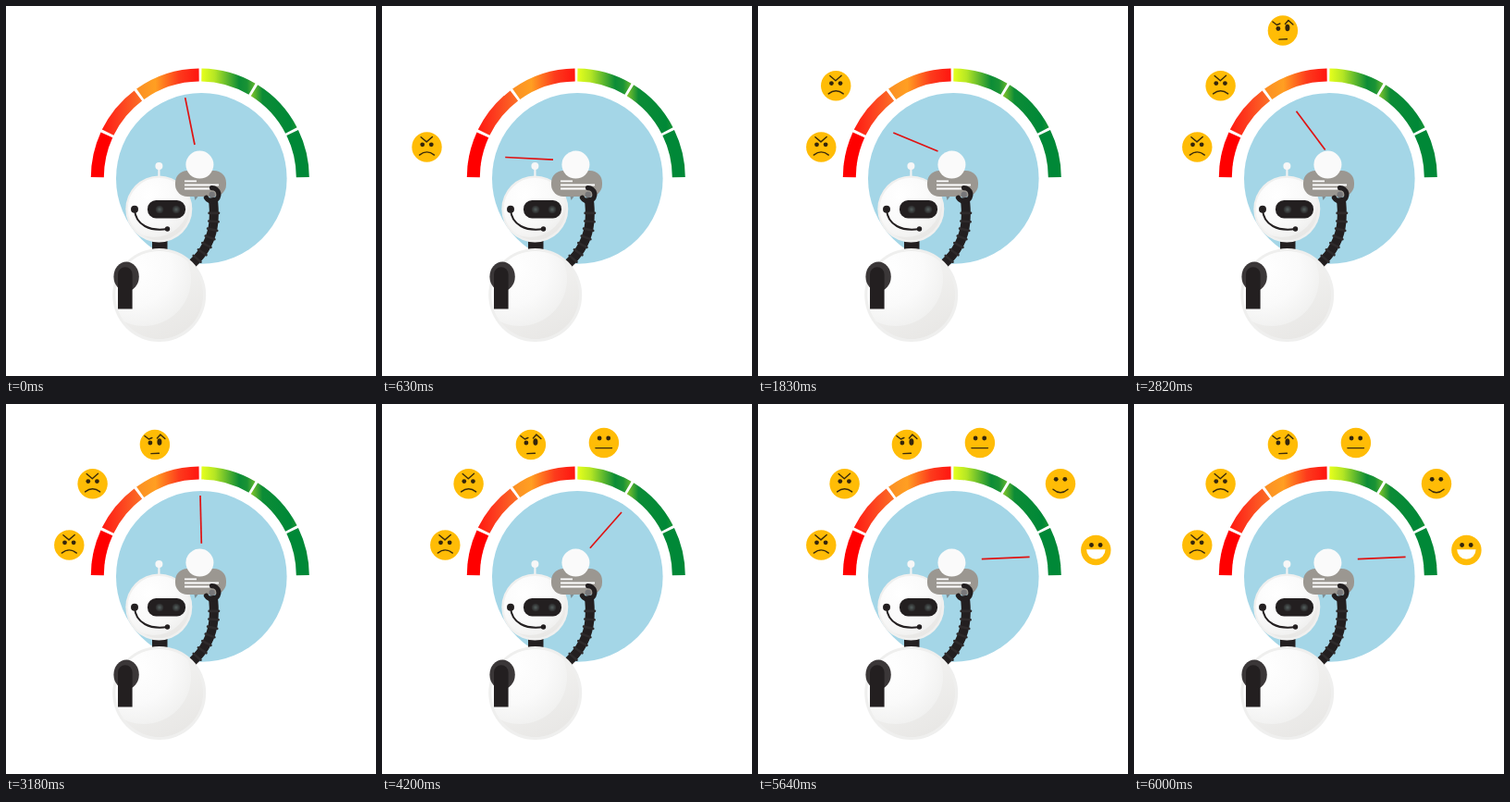
These frames come from a looping animation (400x400 px, 7080 ms). An HTML page:

```html
<!DOCTYPE html>
<html lang="en">
<head>
<meta charset="utf-8">
<title>Mood gauge</title>
<style>
  html, body { margin: 0; width: 100%; height: 100%; overflow: hidden; background: #fff; }
  svg { display: block; width: 100vw; height: 100vh; }
  .ink { fill: none; stroke: #3a2b0c; stroke-width: 1.4; stroke-linecap: round; stroke-linejoin: round; }
  .eye { fill: #33250c; }
</style>
</head>
<body>
<svg viewBox="0 0 400 400" xmlns="http://www.w3.org/2000/svg">
  <defs>
    <linearGradient id="g1"><stop stop-color="#ff1a10"/><stop offset=".4" stop-color="#fd3a1e"/><stop offset="1" stop-color="#fb7026"/></linearGradient>
    <linearGradient id="g2"><stop stop-color="#fb8f24"/><stop offset=".3" stop-color="#ff9f22"/><stop offset=".68" stop-color="#fd3a1c"/><stop offset="1" stop-color="#ff1510"/></linearGradient>
    <linearGradient id="g3"><stop stop-color="#e6ff1c"/><stop offset=".25" stop-color="#b4e624"/><stop offset=".7" stop-color="#0c8c36"/><stop offset=".85" stop-color="#1a9335"/><stop offset="1" stop-color="#66b82e"/></linearGradient>
    <linearGradient id="g4"><stop stop-color="#86c62a"/><stop offset=".25" stop-color="#0c8c36"/><stop offset=".85" stop-color="#008837"/><stop offset="1" stop-color="#1a9335"/></linearGradient>
    <radialGradient id="lit" cx=".42" cy=".4" r=".62"><stop stop-color="#fff"/><stop offset=".6" stop-color="#fafafa"/><stop offset="1" stop-color="#f1f1f0"/></radialGradient>
    <linearGradient id="shade" x1=".2" y1="0" x2=".7" y2="1"><stop stop-color="#f6f6f5"/><stop offset="1" stop-color="#e8e7e5"/></linearGradient>
    <radialGradient id="lens"><stop stop-color="#55605f"/><stop offset="1" stop-color="#262425"/></radialGradient>
    <clipPath id="bodyClip"><circle cx="165.7" cy="312.5" r="47.5"/></clipPath>
    <clipPath id="headClip"><circle cx="165.3" cy="219.5" r="33.7"/></clipPath>
  </defs>

  <g id="gauge"></g>
  <circle cx="211.3" cy="186.4" r="92.3" fill="#a4d6e7"/>
  <line id="needle" stroke="#e01212" stroke-width="1.7"/>

  <!-- robot -->
  <path d="M158 253H174.5V265H158Z" fill="#231f20"/>
  <path d="M165.4 176V187" stroke="#f3f3f3" stroke-width="2.2"/>
  <circle cx="165.4" cy="173" r="4" fill="#f7f7f7"/>

  <path id="hose" d="M201 279C215 266 223 250 224.5 233Q225.5 219 223.5 207" fill="none" stroke="#231f20" stroke-width="10"/>
  <g id="ribs" stroke="#2e2a2b" stroke-width="2.6" stroke-linecap="round"></g>

  <circle cx="165.7" cy="312.5" r="50.5" fill="#efefee"/>
  <g clip-path="url(#bodyClip)">
    <circle cx="165.7" cy="312.5" r="47.5" fill="url(#shade)"/>
    <circle cx="149" cy="295" r="51" fill="url(#lit)"/>
  </g>
  <circle cx="165.3" cy="219.5" r="36" fill="#f0f0ef"/>
  <g clip-path="url(#headClip)">
    <circle cx="165.3" cy="219.5" r="33.7" fill="url(#shade)"/>
    <circle cx="160" cy="212" r="38" fill="url(#lit)"/>
  </g>

  <rect x="153" y="210" width="41" height="19.5" rx="9.2" fill="#231f20"/>
  <g fill="url(#lens)"><circle cx="166" cy="220" r="4.6"/><circle cx="184" cy="220" r="4.6"/></g>
  <path d="M139 220C140 237 156 244 174.5 241" fill="none" stroke="#231f20" stroke-width="2"/>
  <g fill="#231f20"><circle cx="139" cy="219.8" r="4"/><circle cx="174.5" cy="241" r="2.7"/></g>

  <ellipse cx="130.1" cy="292.5" rx="13.7" ry="16" fill="#3b3738"/>
  <path d="M121 327.5V290a7.8 7.8 0 0 1 15.6 0V327.5Z" fill="#231f20"/>

  <!-- speech bubble held in the hand -->
  <path d="M203 204 L204.5 210 L209 204Z" fill="#7f8f95"/>
  <rect x="183" y="178" width="55" height="28" rx="13" fill="#9b9791"/>
  <path d="M193 189.4H206M193 193.5H230M193 197.5H222" stroke="#fff" stroke-width="1.9"/>
  <circle cx="209.4" cy="171.6" r="15" fill="#fafafa"/>
  <path d="M216.4 207.2A7.2 7.2 0 1 0 222.5 196.6" fill="none" stroke="#231f20" stroke-width="5.2" stroke-linecap="round"/>
  <circle cx="222.7" cy="204" r="3.2" fill="#77777a"/>

  <g id="faces"></g>
</svg>
<script>
const LOOP = 7080, STEP = 30;
const $ = id => document.getElementById(id);
const mix = (a, b, p) => a + (b - a) * p;

// gauge: start angle, end angle (degrees from the left end), fill
const C = { x: 209.8, y: 185.5 }, OUT = 118, IN = 104;
const polar = (r, deg) => {
  const a = deg * Math.PI / 180;
  return `${(C.x - r * Math.cos(a)).toFixed(2)} ${(C.y - r * Math.sin(a)).toFixed(2)}`;
};
const bands = [
  [0.2, 24.6, "#ff0000"], [26.1, 52.9, "url(#g1)"], [54.4, 89.4, "url(#g2)"],
  [90.8, 120.4, "url(#g3)"], [121.9, 152.6, "url(#g4)"], [154.1, 179.8, "#008837"]
];
$("gauge").innerHTML = bands.map(([a, b, fill]) =>
  `<path fill="${fill}" d="M${polar(OUT, a)}A${OUT} ${OUT} 0 0 1 ${polar(OUT, b)}L${polar(IN, b)}A${IN} ${IN} 0 0 0 ${polar(IN, a)}Z"/>`
).join("");

// ribs across the hose
const hose = $("hose"), len = hose.getTotalLength();
for (let d = 8; d < len - 8; d += 9) {
  const p = hose.getPointAtLength(d), q = hose.getPointAtLength(d + 1);
  const nx = (q.y - p.y) * 5.2, ny = (p.x - q.x) * 5.2;
  $("ribs").innerHTML += `<line x1="${p.x - nx}" y1="${p.y - ny}" x2="${p.x + nx}" y2="${p.y + ny}"/>`;
}

// faces, drawn around 0,0
const ink = d => `<path class="ink" d="${d}"/>`;
const eyes = y => `<g class="eye"><circle cx="-4.8" cy="${y}" r="2.4"/><circle cx="4.8" cy="${y}" r="2.4"/></g>`;
const angry = eyes(-2.7) + ink("M-6.4 -10.8L-.3 -5.6L5.9 -11M-8 8.6Q0 2.2 8 8.6");
const doubt = `<g class="eye"><circle cx="-5" cy="-2" r="2.4"/><ellipse cx="5" cy="-3" rx="2.5" ry="3.8"/></g>`
  + ink("M-11 -9.5L-6.5 -6L-3 -7.5M2.5 -7L6 -11L11 -6.5M-4 9.6L4.5 9.2");
const flat = eyes(-5) + ink("M-9 5.6H8.6");
const smile = eyes(-5) + ink("M-8 6Q0 13 8 6");
const grin = eyes(-5.5) + `<path d="M-10.2 -.8H10.2A10.2 10.6 0 0 1 -10.2 -.8Z" fill="#fff"/>`;

// look, first and last ms, start x y, end x y
const faces = [
  [angry, 630, 840, 48.5, 152.5, 68.3, 152.5],
  [angry, 1680, 1950, 72.5, 86.3, 93.6, 86.3],
  [doubt, 2820, 3060, 160.9, 26.5, 160.9, 44],
  [flat, 3990, 4170, 239.9, 32.5, 239.9, 42],
  [smile, 4740, 4950, 342.5, 86.3, 327, 86.3],
  [grin, 5640, 6000, 365.3, 158, 359.4, 158]
];
$("faces").innerHTML = faces.map(([look]) =>
  `<g><circle r="16.2" fill="#ffbc06"/>${look}</g>`).join("");
const nodes = [...$("faces").children];

// needle: time, tip x y, tail x y
const poses = [
  [0, 193.7, 99.2, 204, 150],
  [210, 133.2, 163.5, 185, 166.2],
  [1140, 146.3, 137, 194.5, 157],
  [2130, 175.5, 113.7, 206.7, 155.5],
  [3180, 210, 99, 211.3, 150.8],
  [4200, 259, 117, 224.9, 155.8],
  [5250, 293.6, 165.3, 241.8, 167.7]
];
const HUB = { x: 208, y: 167 };

// turn a point around the hub
function swing(x0, y0, x1, y1, p) {
  const r = mix(Math.hypot(x0 - HUB.x, y0 - HUB.y), Math.hypot(x1 - HUB.x, y1 - HUB.y), p);
  const a = mix(Math.atan2(HUB.y - y0, HUB.x - x0), Math.atan2(HUB.y - y1, HUB.x - x1), p);
  return [HUB.x - r * Math.cos(a), HUB.y - r * Math.sin(a)];
}

function needleAt(t) {
  if (t < 210) {
    const [, ax, ay, bx, by] = poses[0], [, cx, cy, dx, dy] = poses[1], p = t / 210;
    return [...swing(ax, ay, cx, cy, p), ...swing(bx, by, dx, dy, p)];
  }
  return poses.filter(s => s[0] <= t).pop().slice(1);
}

function draw(now) {
  const t = Math.floor(now % LOOP / STEP) * STEP;
  const ends = needleAt(t);
  ["x1", "y1", "x2", "y2"].forEach((k, i) => $("needle").setAttribute(k, ends[i]));
  faces.forEach(([, from, to, x0, y0, x1, y1], i) => {
    const p = Math.min(1, Math.max(0, (t - from) / (to - from)));
    nodes[i].setAttribute("transform", `translate(${mix(x0, x1, p)} ${mix(y0, y1, p)})`);
    nodes[i].setAttribute("visibility", t < from ? "hidden" : "visible");
  });
}

const begin = performance.now();
function tick() {
  draw(Math.max(0, performance.now() - begin));
  requestAnimationFrame(tick);
}
tick();
</script>
</body>
</html>
```
